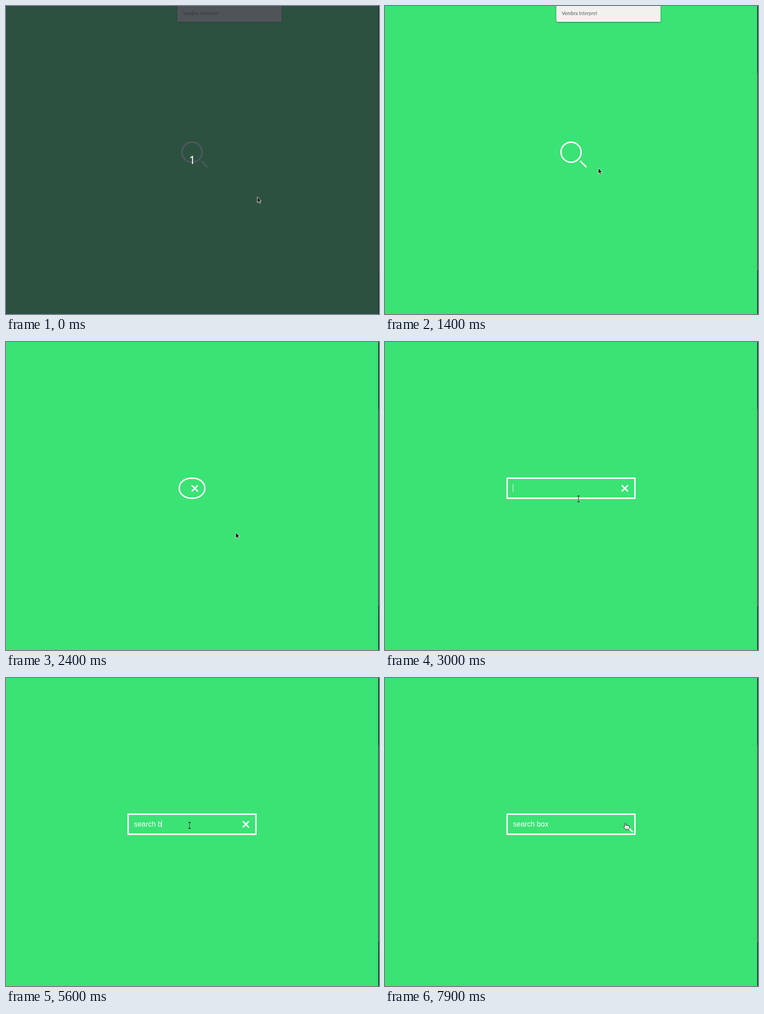
Animation, 823 px wide and 680 px high, one loop 8000 ms. Source, as an HTML page:

```html
<!DOCTYPE html>
<html lang="en">
<head>
<meta charset="utf-8">
<title>Search box</title>
<style>
  html, body { margin: 0; width: 100%; height: 100%; overflow: hidden; background: #3ae374; }
  svg { display: block; width: 823px; height: 680px; }
  .line { fill: none; stroke: #fff; stroke-width: 3.2; }
  .query { font: 16px "Liberation Sans", Arial, sans-serif; fill: #fff; white-space: pre; }
  .label { font: 10.5px Lato, sans-serif; fill: #66696b; }
  .label tspan { fill: #55585a; }
  .count { font: 25px "Noto Sans", sans-serif; fill: #fff; text-anchor: middle; }
  #panel rect { filter: drop-shadow(0 1px 1.5px rgba(0, 0, 0, .5)); }
</style>
</head>
<body>
<svg viewBox="0 0 823 680">
  <rect width="823" height="680" fill="#3ae374"/>
  <rect x="821.5" width="1.5" height="680" fill="#0b1410"/>
  <rect x="821.5" y="148" width="1.5" height="436" fill="#46594e"/>

  <g id="panel">
    <rect x="378" y="-10" width="230" height="45" rx="2" fill="#f1f2ed"/>
    <text class="label" x="390" y="20"><tspan>Vembra</tspan> Interpret</text>
  </g>

  <rect id="box" class="line" y="300.6" height="44.3"/>
  <g id="mark">
    <path class="line" d="M-6.8-6.8L6.8 6.8"/>
    <path id="arm" class="line" d="M-6.8 6.8L6.8-6.8"/>
  </g>
  <text id="query" class="query" x="282.4" y="327.5"></text>
  <rect id="caret" y="313.5" width="1" height="17" fill="#fff"/>

  <g id="countdown">
    <rect width="823" height="680" fill="#282d35" opacity=".8"/>
    <text class="count" x="411" y="349">1</text>
  </g>

  <g id="pointer">
    <path id="arrow" d="M.5.7V13.6L3.4 10.9 5.4 15.4 7.5 14.5 5.5 10.1H9.4Z" fill="#111" stroke="#fff" stroke-width=".9"/>
    <g id="beam" fill="none">
      <path id="stem" d="M-2.5-6.5H-1L0-5.5 1-6.5H2.5M0-5.5V5.5M-2.5 6.5H-1L0 5.5 1 6.5H2.5" stroke="#26382d" stroke-width="1.9"/>
      <path d="M0-5.5V5.5" stroke="#a5dcb8" stroke-width=".8"/>
    </g>
    <g id="hand" transform="translate(-4 0)">
      <path d="M3 8.2V1.9a1.3 1.3 0 0 1 2.6 0V6a1.2 1.2 0 0 1 2.4.2 1.2 1.2 0 0 1 2.4.5 1.2 1.2 0 0 1 2.4.9V10.5q0 2-1.2 3.2V15H5.2V13.8L1 9.8a1.3 1.3 0 0 1 2-1.6z" fill="#fff" stroke="#111" stroke-linejoin="round"/>
      <path d="M7 10.5v2.6M9 10.5v2.6" stroke="#111" stroke-width=".6"/>
    </g>
  </g>
</svg>
<script>
const $ = id => document.getElementById(id);
const LOOP = 8000, STEP = 100;
const MID = { x: 410.5, y: 323 };
const SIZE = 47.5, WIDE = 285, STROKE = 3.2;
const WORDS = 'search box';

// pointer moves: begin, end, goal x, goal y
const MOVES = [
  [800, 1400, 470, 357],
  [1500, 1700, 423.5, 323],
  [2000, 2500, 516, 431],
  [2500, 3200, 405, 325.5],
  [6700, 6800, 419, 329],
  [7300, 7500, 520, 333.5],
  [7600, 7700, 530, 320]
];

const clamp = p => Math.max(0, Math.min(1, p));
const mix = (a, b, p) => a + (b - a) * p;
const ease = (t, from, to) => {
  const p = clamp((t - from) / (to - from));
  return p * p * (3 - 2 * p);
};
const set = (id, attrs) => {
  for (const k in attrs) $(id).setAttribute(k, attrs[k]);
};
const show = (id, on) => { $(id).style.visibility = on ? 'visible' : 'hidden'; };
const place = (id, x, y) => set(id, { transform: `translate(${x} ${y})` });

const opening = t => ease(t, 2320, 2910);
const halfWidth = t => mix(SIZE, WIDE, opening(t)) / 2;

function drawSearch(t) {
  const open = opening(t), half = halfWidth(t), inner = half - STROKE / 2;
  set('box', {
    x: MID.x - inner,
    width: inner * 2,
    rx: inner * (1 - open),
    ry: (SIZE - STROKE) / 2 * (1 - open)
  });

  // the handle slides inside and gains a second arm to become the cross
  const cross = ease(t, 2000, 2420) - ease(t, 7750, 8100);
  const arm = clamp((cross - 0.6) / 0.4);
  place('mark', MID.x + half + mix(3.3, -23.8, cross), mix(349, MID.y, cross));
  set('arm', { transform: `scale(${arm})` });
  show('arm', arm > 0);
}

// typing starts slowly, then speeds up
const keyTime = i => 3600 + Math.min(345 * i, 690 + 175 * i);

function drawText(t) {
  const text = [...WORDS].filter((c, i) => t >= keyTime(i)).join('');
  const query = $('query');
  query.textContent = text;
  const width = text ? query.getComputedTextLength() : 0;
  set('caret', { x: Math.floor(282.4 + width) });
  show('caret', (t >= 2900 && t < 6700) || (t >= 7100 && t < 7700));
}

function drawPointer(t) {
  let x = 554, y = 420.5;
  for (const [from, to, goalX, goalY] of MOVES) {
    const p = ease(t, from, to);
    x = mix(x, goalX, p);
    y = mix(y, goalY, p);
  }
  place('pointer', x, y);

  const half = halfWidth(t);
  const onIcon = Math.hypot(x - (MID.x + half - SIZE / 2), y - MID.y) < 13.5;
  const inBox = Math.abs(x - MID.x) < half && Math.abs(y - MID.y) < SIZE / 2;
  const kind = onIcon ? 'hand' : inBox && opening(t) === 1 ? 'beam' : 'arrow';
  for (const id of ['arrow', 'beam', 'hand']) show(id, id === kind);
}

function render(now) {
  // ten pictures a second
  const t = Math.floor((now % LOOP) / STEP) * STEP;
  show('countdown', t < 200);
  $('panel').style.opacity = 1 - ease(t, 1950, 2150);
  drawSearch(t);
  drawText(t);
  drawPointer(t);
}

const start = performance.now();
function tick() {
  render(performance.now() - start);
  requestAnimationFrame(tick);
}
tick();
</script>
</body>
</html>
```
